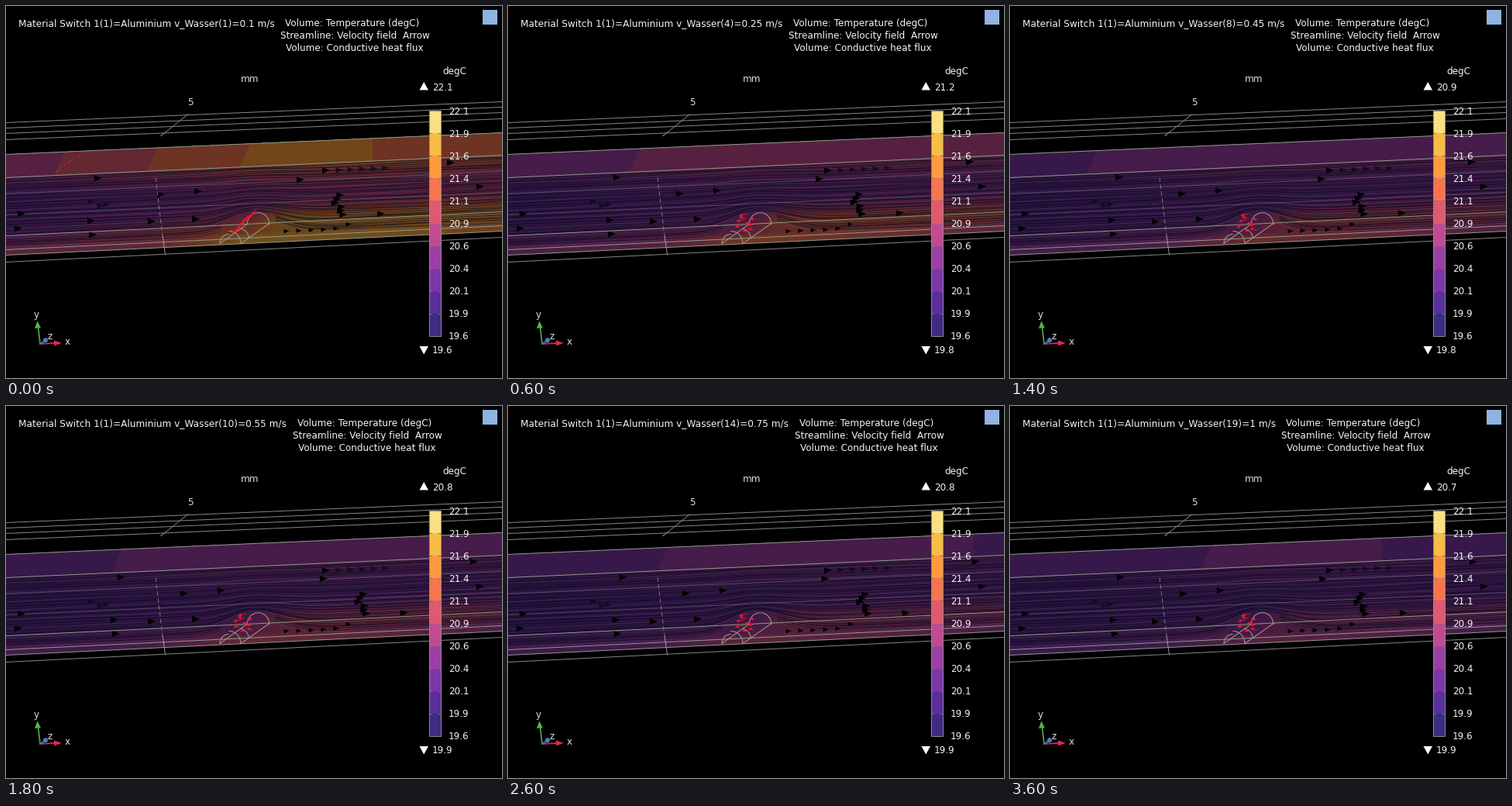
Write a matplotlib script that moves like this. It is 640 px wide and 480 px high and loops after 3.8 s.

```python
import numpy as np
import matplotlib
import matplotlib.pyplot as plt
from matplotlib.animation import FuncAnimation
from matplotlib.collections import LineCollection, PolyCollection
from matplotlib.colors import to_rgb
from matplotlib.patches import Polygon, Rectangle, Circle

matplotlib.rcParams["font.family"] = "DejaVu Sans"
W, H, DPI = 640, 480, 100
STEPS, STEP_MS = 19, 200
PX = 72 / DPI

BAR = ["#3f2b82", "#5a2f9b", "#7b37a8", "#9c3fa5", "#c14a91",
       "#de5a70", "#f6754f", "#ff9a3e", "#f7bd45", "#fbe083"]
RGB = np.array([to_rgb(c) for c in BAR])

fig = plt.figure(figsize=(W / DPI, H / DPI), dpi=DPI, facecolor="black")
ax = fig.add_axes([0, 0, 1, 1])
ax.axis("off")


def speed(i):
    return 0.1 + 0.05 * i


def slowness(i):
    """1 at the slowest flow, fading to 0 by 0.25 m/s."""
    return np.clip((1 / speed(i) - 4) / 6, 0, 1)


def smooth(v, mid, width):
    return 1 / (1 + np.exp(-np.clip((v - mid) / width, -40, 40)))


def line(pts, color="#8b938a", lw=1.0, z=6, **kw):
    x, y = np.array(pts, float).T
    ax.plot(x, y + 0.5, color=color, lw=lw * PX, zorder=z, **kw)


def shape(pts, color):
    ax.add_patch(Polygon(pts, fc=color, ec="none", zorder=10))


def text(x, y, s, color="#f2f2f2", ha="left", size=12):
    return ax.text(x, y, s, color=color, ha=ha, va="baseline",
                   fontsize=size * PX, zorder=12)


def head(x, y, size, ang=-0.045):
    c, s = np.cos(ang), np.sin(ang)
    pts = np.array([(0.5, 0), (-0.5, -0.4), (-0.5, 0.4)]) * size
    return pts @ np.array([(c, s), (-s, c)]) + (x, y)


# --- heat field: level index 0..9 along the duct, falling with speed ------
Y0, Y1 = 160, 324
X, Y = np.meshgrid(np.arange(W) + 0.5, np.arange(Y0, Y1) + 0.5)
TOP = 191 - 28 / W * X
BOT = 321.5 - 31 / W * X
S = (Y - TOP) / (BOT - TOP)
INSIDE = ((S >= 0) & (S <= 1)).astype(float)


def wall_level(i):
    u = 1 / speed(i)
    g = np.log(u)
    rise = 3 + (X + 60 * S - 260 + 184 * g) / (235 - 50 * g)
    fall = 3 + (480 + 420 * g - X) / (460 - 94 * g)
    return np.clip(np.minimum(np.minimum(rise, fall), 3 + 0.42 * u), 2, 9)


def heat(i):
    g = np.log(1 / speed(i))
    wall, wake, floor = wall_level(i), 4 + 1.6 * g, 2.2 + 0.95 * g

    edge = np.clip(((S - 0.55) / 0.3) ** 2, 0, 1)
    t = 1 + (wall - 1) * (0.22 + 0.42 * edge + 0.36 * X / W)

    plume = smooth(X, 332, 10) * np.exp(-((S - 0.81) / 0.13) ** 2)
    t += (wake - t) * plume * (1 - 0.2 * smooth(X, 480, 60))

    ahead = floor + (wake - floor) * np.exp(-((X - 330) / 100) ** 2)
    behind = wake + (wall + 0.3 - wake) * np.clip((X - 330) / 260, 0, 1)
    skin = smooth(S, 0.91, 0.012)
    t += (np.where(X < 330, ahead, behind) - t) * skin

    roof = S < 0.23
    t = np.where(roof, np.floor(wall), t)
    dim = np.where(roof, 0.45, 0.41 + 0.04 * skin)
    rgb = [np.interp(t, np.arange(10), RGB[:, k]) * dim for k in range(3)]
    return np.dstack(rgb + [INSIDE])


field = ax.imshow(heat(0), extent=(0, W, Y1, Y0), interpolation="nearest",
                  aspect="auto", zorder=1)
ax.set(xlim=(0, W), ylim=(H, 0))

# --- streamlines ----------------------------------------------------------
rng = np.random.default_rng(5)
LINES = 46
STARTS = np.linspace(223, 311, LINES) + rng.uniform(-1.1, 1.1, LINES)
PHASE = rng.uniform(0, 2 * np.pi, LINES)


def stream(c, ph, i):
    x = np.linspace(0, W, 130)
    y = c - (0.0437 + 0.0047 * (c - 191) / 130) * x
    width = np.where(x < 318, 40, 52 + 6 * np.sin(0.7 * i))
    lift = 21 * np.exp(-max(300 - c, 0) / 26)
    y -= lift * np.exp(-((x - 318) / width) ** 2)
    y += 0.9 * np.sin(x / 60 + ph + 0.25 * i) * smooth(x, 330, 30)
    y += 0.6 * np.sin(x / 70 + ph)
    pts = np.column_stack([x, y])
    return [pts[x < 278], pts[x > 345]] if c > 300 else [pts]


def collect(kind, z, **kw):
    return ax.add_collection(kind([], zorder=z, **kw), autolim=False)


dark = collect(LineCollection, 2, colors="#0c0a20", linewidths=PX, alpha=0.62)
pale = collect(LineCollection, 2, colors="#8d7c9c", linewidths=0.8 * PX, alpha=0.2)
cones = collect(PolyCollection, 5, facecolors="black")
faint = collect(PolyCollection, 4, facecolors="#0d0818", alpha=0.75)
flux = collect(PolyCollection, 8, facecolors="#ff1428")
tails = collect(LineCollection, 8, colors="#e01430", linewidths=0.9 * PX)
specks = collect(PolyCollection, 3, facecolors="#c01850")

# --- flow arrows: some stay, some drift along the duct --------------------
RESTING = [(20, 268), (16, 287), (413, 212), (612, 233), (245, 275), (188, 278)]
DRIFTING = [(145, 221), (406, 223), (600, 201), (136, 276), (226, 242),
            (274, 238), (510, 267), (138, 294)]
CLUSTER = np.column_stack([rng.normal(460, 5, 6), np.linspace(243, 268, 6)])
TRAIL = [(x, 305 - 0.04 * x - 10 * smooth(x, 440, 6)) for x in range(362, 450, 16)]
FAINT = ([(x, 231 - 0.045 * x) for x in range(430, 500, 15)]
         + [(x, 258 - 8 * (x - 120) / 40 % 8) for x in (110, 122, 130)])
faint.set_verts([head(x, y, 9) for x, y in FAINT])


def flow_heads(i):
    shift = 4 * np.sin(1.6 * i) - 26 * slowness(i)
    moved = [(x + shift, y - 0.045 * shift) for x, y in DRIFTING + list(CLUSTER)]
    return ([head(x, y, 10) for x, y in RESTING + moved]
            + [head(x, y, 7) for x, y in TRAIL])


def flux_arrows(i):
    """Along the cylinder when slow, gathered in level rows when fast."""
    mix = slowness(i)
    heads, stems = [], []
    for k, s in enumerate(np.linspace(-1, 1, 9)):
        x = 305 + (1 - mix) * 10 * np.sin(2.3 * k) + mix * 12 * s + np.sin(1.3 * i + k)
        y = 280 - (10 + 2 * mix) * s
        ang = np.pi + 0.25 * np.sin(2.1 * k) - 0.7 * mix
        tail = (5 + 2 * (k % 3)) * np.array([np.cos(ang), np.sin(ang)])
        heads.append(head(x, y, 5, ang))
        stems.append([(x, y), (x, y) - tail])
    return heads, stems


SPECKS = [(78 + 12 * s + rng.normal(0, 2), 204 - 10 * s) for s in np.linspace(-1, 1, 8)]

# --- box edges ------------------------------------------------------------
for a, b in [(150, 123), (157, 130), (164, 137), (172, 145), (330, 298)]:
    line([(0, a), (W, b)], "#858585")
for a, b in [(191, 163), (221, 192), (296, 265), (314, 283), (321, 290)]:
    line([(0, a), (W, b)], "#8d998a")
for a, b in [(242, 213), (269, 240)]:
    line([(0, a), (W, b)], "#a095a8", 0.9, 3, alpha=0.45)
line([(193, 221), (202, 296)], "#a8a8a8", 0.9, dashes=(6, 4), alpha=0.7)
line([(202, 296), (205.5, 320)], "#a8a8a8", alpha=0.9)
line([(235, 139), (200, 167)], "#777777")
line([(207, 161.5), (200, 167)], "#5f8a55")


def arch(cx, cy, rx, ry, a0, a1):
    a = np.radians(np.linspace(a0, a1, 8))
    line(np.column_stack([cx + rx * np.cos(a), cy - ry * np.sin(a)]), "#a39d94", 1, 7)


# heated half cylinder
arch(325.5, 281, 14.5, 15, 0, 180)
arch(287, 306, 11, 12, 90, 180)
arch(288, 306, 15, 16, 0, 90)
arch(298, 298, 15, 12, 0, 70)
for pts in ([(276, 306), (311, 281)], [(303, 306), (340, 280)]):
    line(pts, "#a39d94", 1, 7)

# --- colour bar -----------------------------------------------------------
BX, BY, BW, BH = 546, 135, 15, 29.1
for k, c in enumerate(BAR[::-1]):
    ax.add_patch(Rectangle((BX, BY + k * BH), BW, BH + 0.3, fc=c, ec="none", zorder=9))
ax.add_patch(Rectangle((BX, BY), BW, 10 * BH, fc="none", ec="#8c8c8c",
                       lw=PX, zorder=10))
for k in range(11):
    y = BY + k * BH
    for x in (BX, BX + BW - 3):
        line([(x, y - 0.5), (x + 3, y - 0.5)], "#777777", 1, 10)
    text(571, y + 4.5, f"{22.11 - 0.25 * k:.1f}")
text(578.5, 88, "degC", ha="center")
shape([(533.5, 108.5), (545, 108.5), (539.2, 98)], "white")
shape([(533.5, 439), (545, 439), (539.2, 449.5)], "white")

# --- labels, badge and triad ----------------------------------------------
text(315, 98, "mm", "#dddddd", "center")
text(237.5, 128, "5", "#dddddd", "center")
ax.add_patch(Rectangle((615, 5), 19, 19, fc="#8fb4e0", ec="none", zorder=10))

for tip, color in [((41.5, 414), "#4aa34a"), ((63, 434.5), "#d6285c"),
                   ((51, 431), "#4578b8")]:
    line([(44, 435.5), tip], color, 1.8, 10)
shape([(37, 416), (45, 415.2), (40.4, 406.5)], "#55b04f")
shape([(62, 431.5), (62, 438.5), (72, 434.8)], "#e0285c")
ax.add_patch(Circle((51, 431.2), 3, fc="#4a7fc4", zorder=10))
for x, y, s in [(39.5, 402, "y"), (79.5, 437, "x"), (57, 430, "z")]:
    text(x, y, s, "#dcdcdc", "center")

case = text(16, 26, "", size=12.12)
titles = [text(0, 26 + 16 * k, s, ha="center") for k, s in enumerate(
    ["Volume: Temperature (degC)",
     "Streamline: Velocity field  Arrow",
     "Volume: Conductive heat flux"])]
highest, lowest = text(550, 109, ""), text(550, 448, "")


def draw(i):
    v = speed(i)
    field.set_data(heat(i))

    runs = [stream(c, ph, i) for c, ph in zip(STARTS, PHASE)]
    dark.set_segments([p for k, r in enumerate(runs) if k % 6 != 3 for p in r])
    pale.set_segments([p for r in runs[3::6] for p in r])

    cones.set_verts(flow_heads(i))
    heads, stems = flux_arrows(i)
    flux.set_verts(heads)
    tails.set_segments(stems)
    shown = round(len(SPECKS) * slowness(i))
    specks.set_verts([head(x, y, 3, 2.4) for x, y in SPECKS[:shown]])

    tag = f"({i + 1})={round(v, 2):g}"
    case.set_text(f"Material Switch 1(1)=Aluminium v_Wasser{tag} m/s")
    # a digit is 8 px wide, a point 4 px
    shift = 8 * sum(ch.isdigit() for ch in tag) + 4 * tag.count(".")
    for t, x in zip(titles, (419, 422, 421.5)):
        t.set_x(x + shift)
    highest.set_text(f"{round(20.55 + 0.155 / v, 1):g}")
    lowest.set_text(f"{round(19.91 - 0.031 / v, 1):g}")
    return []


anim = FuncAnimation(fig, draw, frames=STEPS, interval=STEP_MS,
                     init_func=lambda: draw(0), repeat=True, repeat_delay=0, blit=False)
plt.show()
```
